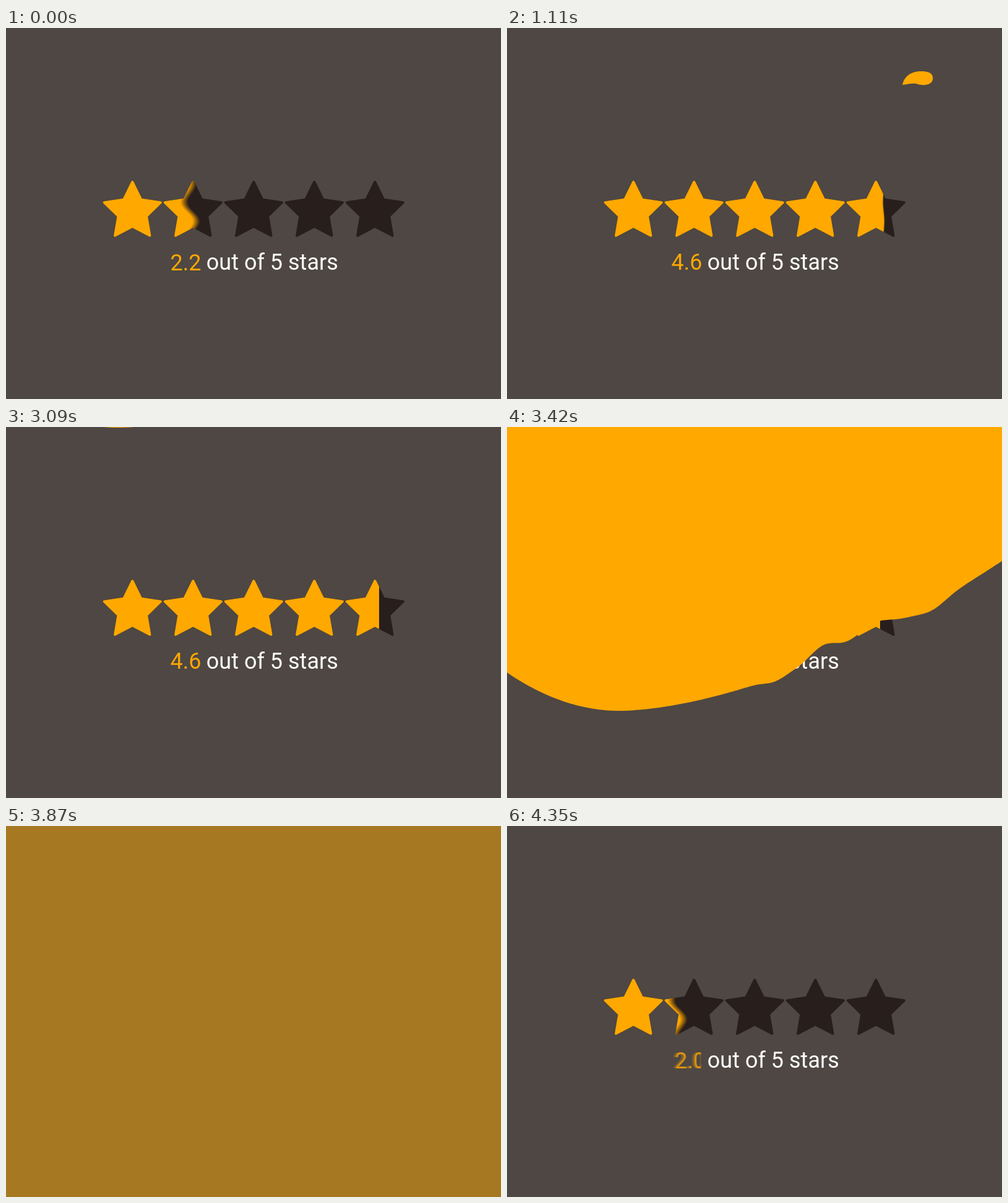
An HTML page with a canvas for the animation above (4380 ms loop, 800 by 600 pixels).

```html
<!DOCTYPE html>
<html lang="en">
<head>
<meta charset="utf-8">
<title>Star rating</title>
<style>
  html, body { margin: 0; width: 100%; height: 100%; overflow: hidden; background: #4e4743; }
  canvas { display: block; width: 800px; height: 600px; }
</style>
</head>
<body>
<canvas id="stage" width="800" height="600"></canvas>
<script>
const W = 800, H = 600, LOOP = 4380, SHUTTER = 15, SAMPLES = 8;
const BG = '#4e4743', DARK = '#281e1c', GOLD = '#ffa800';
const FONT = '36px "Roboto Slab", Roboto, sans-serif', BASE = 391, SCORE_X = 265.6;

const ctx = document.getElementById('stage').getContext('2d');
const clamp = (v, a = 0, b = 1) => Math.min(b, Math.max(a, v));
const ramp = (t, from, to) => clamp((t - from) / (to - from));
const bump = (x, center, width) => Math.exp(-(((x - center) / width) ** 2));

function makeLayer() {
  const c = document.createElement('canvas');
  c.width = W;
  c.height = H;
  return c.getContext('2d');
}

// Five regular stars, rounded by their stroke.
function starRow(color) {
  const g = makeLayer();
  g.fillStyle = g.strokeStyle = color;
  g.lineWidth = 4;
  g.lineJoin = 'round';
  for (let i = 0; i < 5; i++) {
    g.beginPath();
    for (let k = 0; k < 10; k++) {
      const r = k % 2 ? 24 : 48, a = k * Math.PI / 5;
      g.lineTo(204.3 + 98 * i + r * Math.sin(a), 297 - r * Math.cos(a));
    }
    g.closePath();
    g.fill();
    g.stroke();
  }
  return g.canvas;
}

const darkStars = starRow(DARK), goldStars = starRow(GOLD);
const fillLayer = makeLayer();

// Mean position of the liquid edge: rush in, overshoot, slosh, settle.
function edgeX(s) {
  const speed = 0.73, peak = 530;
  if (s < 0) return 297 + speed * s;
  if (s < peak) {
    const u = s / peak, v = 1 - u;
    return 297 * (1 + 2 * u) * v * v + speed * s * v * v + 620 * u * u * (3 - 2 * u);
  }
  const swing = clamp(1 - (s - peak) / 1600);
  return 603 + 17 * swing * Math.cos(2 * Math.PI * (s - peak) / 500);
}

function edgePath(g, s) {
  const x = edgeX(s);
  const amp = 11 * Math.exp(-Math.max(0, s) / 500) * clamp((2130 - s) / 500);
  g.beginPath();
  g.moveTo(100, 240);
  for (let y = 240; y <= 345; y += 3) {
    g.lineTo(x + amp * Math.sin(2 * Math.PI * (y - 297) / 68) * bump(y, 297, 50), y);
  }
  g.lineTo(100, 345);
  g.fill();
}

// Averages several moments of the edge for motion blur, then cuts out the stars.
function drawFill(s) {
  const g = fillLayer;
  g.globalCompositeOperation = 'source-over';
  g.clearRect(0, 0, W, H);
  g.globalCompositeOperation = 'lighter';
  g.globalAlpha = 1 / SAMPLES;
  g.fillStyle = GOLD;
  for (let k = 0; k < SAMPLES; k++) edgePath(g, s + SHUTTER * (k / (SAMPLES - 1) - 0.5));
  g.globalAlpha = 1;
  g.globalCompositeOperation = 'destination-in';
  g.drawImage(goldStars, 0, 0);
  ctx.drawImage(g.canvas, 0, 0);
}

function drawCaption() {
  ctx.font = FONT;
  ctx.fillStyle = '#fff';
  ctx.fillText('out of 5 stars', 323.8, BASE);
}

function score(s) {
  const v = 4.6 - 2.4 * Math.pow(clamp(1 - s / 560, 0, 2), 1.55);
  return (Math.floor(Math.max(0, v) * 10 + 0.1) / 10).toFixed(1);
}

function drawScore(s) {
  ctx.save();
  ctx.font = FONT;
  ctx.fillStyle = GOLD;
  if (s < 0) {
    // Slides in from behind the caption, with a short trail.
    ctx.beginPath();
    ctx.rect(200, 340, 113.5, 70);
    ctx.clip();
    const shown = clamp(1 + s / 200);
    for (let k = 0; k < 3; k++) {
      const r = Math.min(0, s + k * 11);
      ctx.globalAlpha = shown * 0.85 / (1 + 1.5 * k);
      ctx.fillText(score(s), SCORE_X - 0.2 * r, BASE + 0.6);
    }
  } else {
    const pop = 1 + 0.28 * Math.sin(Math.PI * ramp(s, 560, 860));
    ctx.translate(289, 378);
    ctx.scale(pop, pop);
    ctx.fillText(score(s), SCORE_X - 289, BASE - 378 + 0.6 * (1 - ramp(s, 0, 540)));
  }
  ctx.restore();
}

const BLOB = new Path2D('M-25 11C-22 -4 -10 -11 6 -11C20 -11 25 -6 24 2C22 12 8 13 -3 9C-12 8 -19 11 -25 11Z');

function drawSplash(s) {
  ctx.fillStyle = GOLD;
  if (s > 675 && s < 1760) {
    const d = s - 1110, size = ramp(s, 660, 860);
    ctx.save();
    ctx.translate(664 + 0.21 * d, 81 + 0.0011 * d * d);
    ctx.rotate(Math.atan2(0.0022 * d, 0.5));
    ctx.scale(size, size);
    ctx.filter = 'blur(0.7px)';
    ctx.fill(BLOB);
    ctx.restore();
  }
  if (s > 560 && s < 960) {
    const d = s - 560;
    ctx.beginPath();
    ctx.ellipse(620 + 0.5 * d, 290 - 0.35 * d + 0.0011 * d * d, 8, 5.5, 0, 0, 2 * Math.PI);
    ctx.fill();
  }
}

// Height of the flood's lower edge above its lowest point, with ripples on the right.
function floodRise(x) {
  const d = x - 182;
  if (d < 0) return 0.00187 * d * d;
  return 0.00496 * Math.pow(d, 1.68) - 6 * bump(x, 432, 22) + 22 * bump(x, 512, 32)
    + 20 * bump(x, 592, 38) - 10 * bump(x, 688, 30);
}

function drawFlood(t) {
  if (t < 3085) return;
  const low = 457 * Math.pow((t - 3085) / 335, 1.5);
  ctx.fillStyle = GOLD;
  ctx.beginPath();
  ctx.moveTo(0, -400);
  for (let x = 0; x <= W; x += 4) ctx.lineTo(x, low - floodRise(x));
  ctx.lineTo(W, -400);
  ctx.fill();
}

function draw(t) {
  ctx.globalAlpha = 1;
  ctx.fillStyle = BG;
  ctx.fillRect(0, 0, W, H);

  if (t < 3620) {
    ctx.drawImage(darkStars, 0, 0);
    drawFill(t);
    drawCaption();
    drawScore(t);
    drawSplash(t);
    drawFlood(t);
    return;
  }

  // Full cover fades away, then the empty row returns and starts to fill.
  ctx.globalAlpha = 1 - ramp(t, 3660, 4080);
  ctx.fillStyle = GOLD;
  ctx.fillRect(0, 0, W, H);
  ctx.globalAlpha = ramp(t, 3885, 4120);
  ctx.drawImage(darkStars, 0, 0);
  drawCaption();
  ctx.globalAlpha = 1;
  if (t > 4160) {
    drawFill(t - LOOP);
    drawScore(t - LOOP);
  }
}

const start = performance.now();
function tick() {
  draw((performance.now() - start) % LOOP);
  requestAnimationFrame(tick);
}
tick();
</script>
</body>
</html>
```
